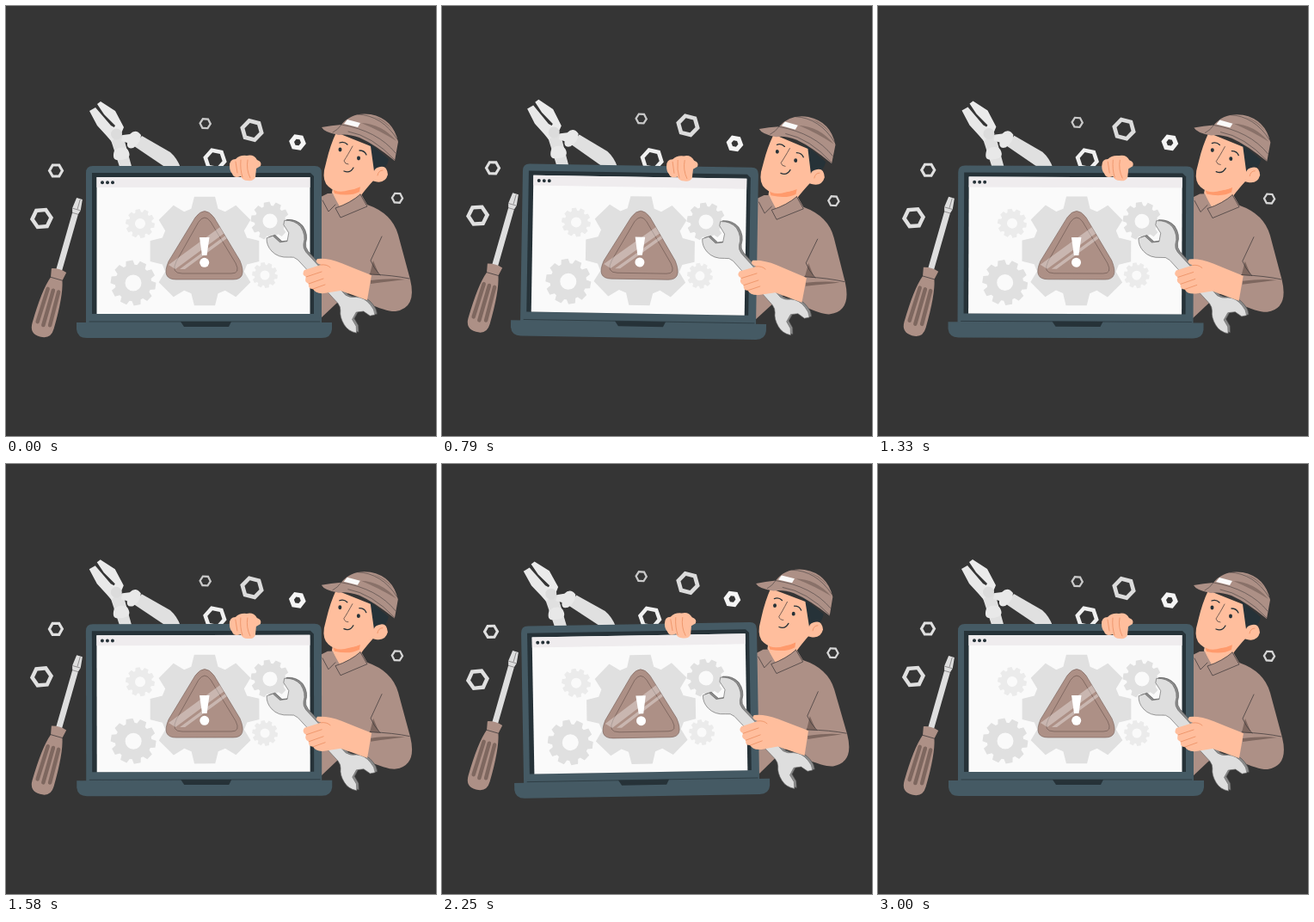
Animation, 500 px wide and 500 px high, one loop 3.04 s. Source, as an HTML page:

```html
<!DOCTYPE html>
<html lang="en">
<head>
<meta charset="utf-8">
<title>Laptop repair</title>
<style>
html, body { margin: 0; width: 100%; height: 100%; overflow: hidden; background: #353535; }
svg { display: block; width: 100vw; height: 100vh; }
.brown { fill: #ad9086; }
.skin { fill: #ffbe9d; }
.dark { fill: #263238; }
.teal { fill: #455a64; }
.line { fill: none; stroke: #3a3637; stroke-width: .7; stroke-linecap: round; stroke-linejoin: round; }
.fold { fill: #7e675f; }
.crease { fill: none; stroke: #eb8f63; stroke-width: .8; stroke-linecap: round; }
</style>
</head>
<body>
<svg viewBox="0 0 500 500">
  <defs>
    <path id="triangle" d="M220 246Q231 231 242 246L272 296Q281 318 264 318H198Q180 318 189 297Z"/>
    <clipPath id="sign"><use href="#triangle"/></clipPath>
    <path id="wrench" d="M-16 -13Q-9 -22 2 -22Q14 -20 19 -11Q22 -7 28 -6.500H96Q102 -8 106 -14Q113 -21 124 -20Q131 -20 136 -16L133 -11L124 -9L119 -2L122 7L131 9L137 14Q129 20 120 18Q110 16 105 10Q102 7 97 6.500H28Q22 7 19 12Q11 22 0 22Q-9 22 -15 16L-12 9L-1 8L4 1L-2 -7L-13 -9Z"/>
  </defs>
  <rect width="500" height="500" fill="#353535"/>

  <g id="floating-nuts"></g>
  <g id="scene">
    <g id="nuts"></g>

    <g id="pliers" fill="#e8e8e8">
      <path d="M121 153L136 150L147 190H133Z" fill="#e0e0e0"/>
      <path d="M97 122L104 118L122 139L133 145L123 158L117 151L106 139Z"/>
      <path d="M106 114L110 111L127 122L137 141L132 153L121 149L127 139L114 126Z" fill="#ebebeb"/>
      <path d="M126 168Q122 181 133 179Q146 178 143 170Q141 163 131 165Z"/>
      <path d="M149 163L158 151L191 170Q199 177 203 188H186Z" fill="#e0e0e0"/>
      <path d="M136 150L144 149Q151 142 157 150Q157 159 148 165Q140 167 141 159L134 157Z"/>
      <circle cx="128.500" cy="149" r="6.500" fill="#dcdcdc"/>
    </g>

    <g id="torso">
      <path class="brown" d="M362 224L374 218L412 217L420 231Q449 241 456 266L470 318Q478 351 453 355Q444 356 419 345L424 310L420 315L384 346L366 363H350Z"/>
      <path class="fold" d="M427 296L423 312L434 313ZM424 319Q448 316 464 318Q448 320 424 323Z"/>
      <path class="line" d="M437 268L424 296Q427 304 435 313M424 312Q450 313 469 317M424 312L419 341"/>
    </g>
    <g id="neck">
      <path class="skin" d="M381 205L428 192L428 202Q419 212 413 220L412 224L389 235L379 217Z"/>
      <path d="M380 212Q396 217 412 210L411 216Q400 222 382 218Z" fill="#ff9a6c"/>
      <path class="brown" d="M412 219L420 233L389 246L383 235Q401 228 412 219ZM380 218L385 230L374 239L367 229Z"/>
      <path class="line" d="M412 219L420 233L389 246L383 235Q401 229 412 219M383 231L375 239L368 226"/>
    </g>
    <g id="head">
      <path class="dark" d="M422 159L445 178Q443 188 435 191L427 192L421 170Z"/>
      <path class="skin" d="M384 147Q377 162 373 179L370 191Q368 204 375 210Q385 219 399 214Q414 212 422 202L429 204Q441 207 444 196Q443 185 435 187Q429 188 428 192L424 163Z"/>
      <path class="crease" d="M432 197Q433 191 438 191"/>
      <g class="dark"><ellipse cx="388.500" cy="167" rx="2" ry="2.400"/><ellipse cx="410" cy="177" rx="2" ry="2.400"/></g>
      <path d="M388 159Q393 157 397 161M411 168Q417 168 419 173M393 192Q400 195 404 188" class="line" style="stroke-width:1.300;stroke:#263238"/>
      <path d="M403 163Q397 174 393 180Q394 184 398 184" class="line"/>
      <path class="brown" d="M367 141Q378 139 390 138Q402 123 424 126Q450 131 456 158L452 180Q429 161 411 153Q397 148 387 150Q370 147 367 141Z"/>
      <path class="fold" d="M413 136Q437 137 454 157Q435 145 413 136ZM426 128Q442 132 450 145Q441 134 426 128Z" opacity=".75"/>
      <path class="line" d="M390 138Q386 144 380 147M390 138Q432 145 453 171M409 126Q437 127 455 155M398 146Q426 151 452 179" opacity=".75"/>
      <path d="M397 132L412 136L409 141L393 137Z" fill="#fafafa"/>
    </g>

    <g id="laptop">
      <path class="teal" d="M93 194Q93 186 101 186H359Q367 186 367 194V370H93Z"/>
      <path class="dark" d="M100 194H354L358 198V358H100Z"/>
      <rect x="105.500" y="199" width="248" height="159" fill="#fafafa"/>
      <rect x="105.500" y="199" width="248" height="12" fill="#efecee"/>
      <g class="dark"><circle cx="112" cy="205.300" r="2"/><circle cx="118" cy="205.300" r="2"/><circle cx="124" cy="205.300" r="2"/></g>
      <path class="teal" d="M82 368H379V376Q378 386 367 386H94Q83 386 82 376Z"/>
      <path class="line" d="M97 367H365" style="stroke:#263238"/>
      <path class="dark" d="M203 367H262L259 373H207Z"/>
    </g>
    <g id="gears"></g>
    <g id="warning">
      <use href="#triangle" class="brown" stroke="#745d56" stroke-width=".6"/>
      <path class="line" d="M224 251Q231 241 238 251L267 299Q273 311 262 311H205Q191 311 198 297Z" style="stroke:#5f4c47" opacity=".8"/>
      <g clip-path="url(#sign)" fill="#fff" opacity=".35">
        <path d="M189 301L249 257L254 264L197 306Z"/><path d="M202 306L255 267L257 270L208 306Z"/>
      </g>
      <path d="M225 269H236.500L233.500 290H228Z" fill="#fff"/><circle cx="230.700" cy="298.300" r="5.500" fill="#fff"/>
    </g>

    <g id="left-hand">
      <path class="skin" d="M260 186Q260 178 267 178Q272 173 280 174Q288 172 292 179Q298 181 296 186L291 189L290 199Q288 204 281 203Q275 203 273 198Q265 201 263 195Q260 192 260 186Z"/>
      <path class="crease" d="M267 181L269 194M273 179Q272 190 275 199M281 179Q279 190 284 200"/>
    </g>
    <g id="right-arm">
      <g transform="translate(325 270) rotate(47.300)">
        <use href="#wrench" x="1" y="-2.500" fill="#8b8b8b" stroke="#4e4e4e" stroke-width=".6"/>
        <use href="#wrench" fill="#dedede" stroke="#666" stroke-width=".6"/>
      </g>
      <path class="skin" d="M425 313Q407 306 390 299Q375 293 362 294Q358 298 366 301L347 307Q343 312 349 315Q346 320 352 323Q351 329 357 329Q360 335 370 334L389 331L420 342Z"/>
      <path class="crease" d="M349 315L367 309M352 323L369 317M357 329L371 324M366 301Q373 300 377 304"/>
    </g>
  </g>

  <g id="screwdriver">
    <g transform="translate(85.500 224) rotate(16)">
      <path d="M-3.500 0H3.500L5 13L3.500 18V88H-3.500V18L-5 13Z" fill="#dedede"/>
      <path d="M-4.500 13H4.500M-3.500 18H3.500M1 1V12" class="line" opacity=".6"/>
      <path class="brown" d="M-9 87Q0 84 9 87L7 97Q13 114 13 154Q13 167 0 167Q-13 167 -13 154Q-13 114 -7 97Z"/>
      <path d="M-7 97H7" class="line"/>
      <path d="M-6.500 111L-7.500 151M0 111V153M6.500 111L7.500 151" stroke="#7e675f" stroke-width="4.500" stroke-linecap="round"/>
    </g>
  </g>
</svg>
<script>
const byId = id => document.getElementById(id);
const scene = byId('scene');
const floaters = [byId('screwdriver'), byId('floating-nuts')];

const polar = (cx, cy, r, a) => `${(cx + r * Math.cos(a)).toFixed(2)} ${(cy + r * Math.sin(a)).toFixed(2)}`;

function addShape(parent, d, fill) {
  const path = document.createElementNS('http://www.w3.org/2000/svg', 'path');
  path.setAttribute('d', d);
  path.setAttribute('fill', fill);
  path.setAttribute('fill-rule', 'evenodd');
  byId(parent).append(path);
}

const circle = (x, y, r) => `M${x - r} ${y}a${r} ${r} 0 1 0 ${2 * r} 0a${r} ${r} 0 1 0 ${-2 * r} 0Z`;

function gear(x, y, r, hole, teeth, turn, fill) {
  const pitch = 2 * Math.PI / teeth;
  const points = [];
  for (let i = 0; i < teeth; i++) {
    const a = turn + i * pitch;
    for (const [k, side] of [[.8, -.39], [1, -.24], [1, .24], [.8, .39]]) {
      points.push(polar(x, y, r * k, a + side * pitch));
    }
  }
  addShape('gears', `M${points.join('L')}Z${hole ? circle(x, y, hole) : ''}`, fill);
}

function nut(parent, x, y, r, hole, turn, fill) {
  const hexagon = radius => 'M' + Array.from({ length: 6 }, (_, i) => polar(x, y, radius, turn + i * Math.PI / 3)).join('L') + 'Z';
  addShape(parent, hexagon(r) + hexagon(hole), fill);
}

gear(231, 285, 64.5, 0, 8, 0, '#e0e0e0');
gear(148, 322, 26.5, 9.5, 10, .14, '#e0e0e0');
gear(307, 250, 22.5, 8.5, 10, .14, '#e0e0e0');
gear(156, 253, 17, 6, 10, .14, '#ebebeb');
gear(301, 313, 15, 5.5, 10, .14, '#ebebeb');

nut('nuts', 58, 191.5, 9.3, 5.7, 0, '#e0e0e0');
nut('nuts', 41.5, 247, 13.6, 8.5, -.08, '#e0e0e0');
nut('floating-nuts', 231.7, 136.7, 7.4, 4.8, .05, '#c9c9c9');
nut('floating-nuts', 286, 144.5, 14.2, 8.8, .25, '#dcdcdc');
nut('nuts', 339, 158.5, 10, 4, .15, '#f5f5f5');
nut('nuts', 243, 178.5, 14, 8.8, .2, '#f0f0f0');
nut('nuts', 455, 223.3, 7.4, 4.8, .05, '#d6d6d6');

// Triangle wave: 0, 1, 0, -1 over one cycle.
const swing = p => p < .25 ? 4 * p : p < .75 ? 2 - 4 * p : 4 * p - 4;

function render(ms) {
  const step = Math.floor((ms % 3040 + 5) * 24 / 1000) % 73;
  const wave = swing(step % 72 / 72);
  scene.setAttribute('transform', `rotate(${wave} 250 250)`);
  for (const part of floaters) part.setAttribute('transform', `translate(0 ${-6 * Math.abs(wave)})`);
}

const start = performance.now();
function tick() {
  render(performance.now() - start);
  requestAnimationFrame(tick);
}
tick();
</script>
</body>
</html>
```
